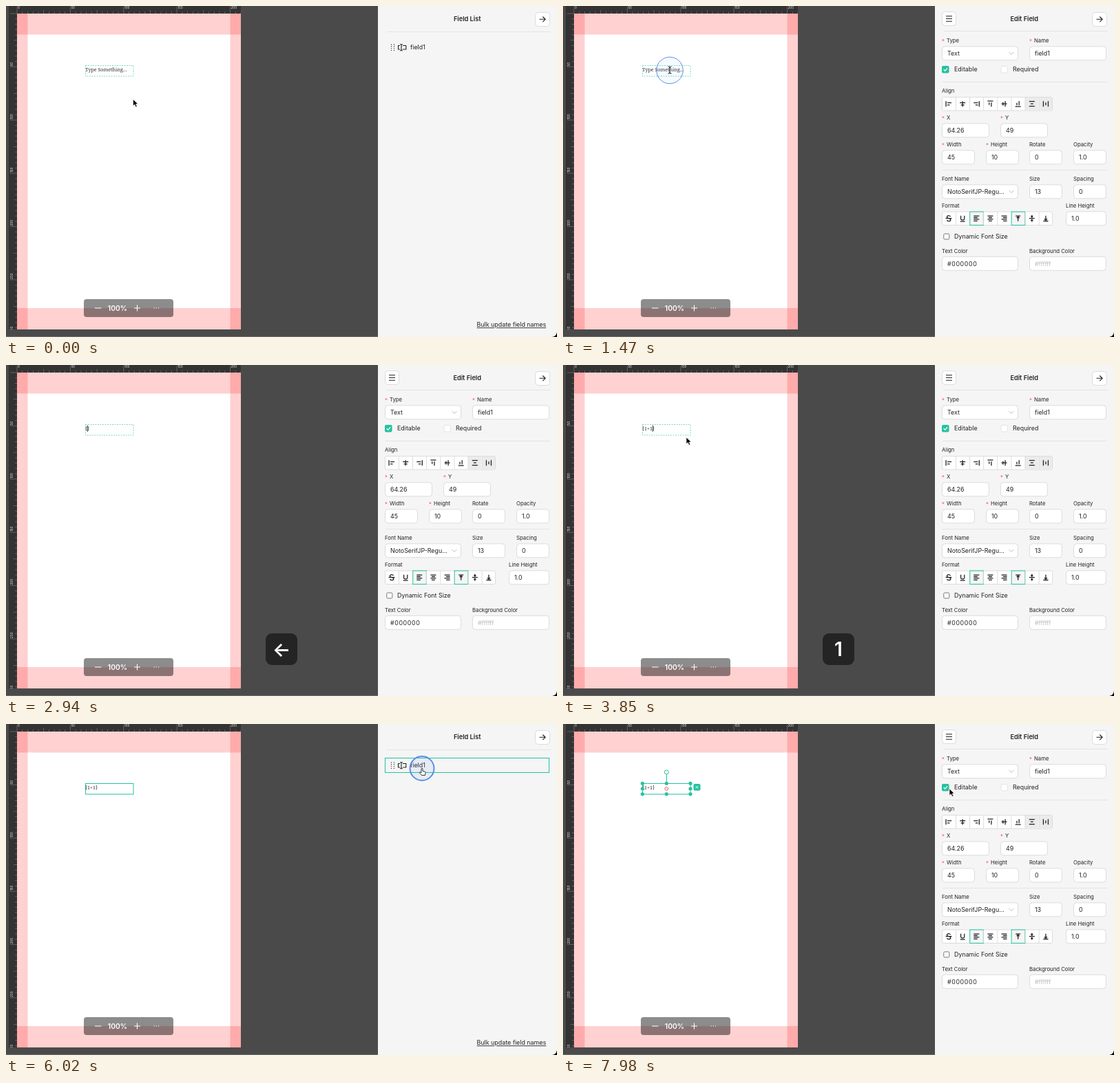
These frames come from a looping animation (800 px wide and 481 px high, 8 s). An HTML page:

```html
<!DOCTYPE html>
<html lang="en">
<head>
<meta charset="utf-8">
<title>Field editor</title>
<style>
html, body { margin: 0; width: 100%; height: 100%; overflow: hidden; background: #4a4a4a; }
svg { display: block; width: 100%; height: 100%; }
text { font-family: Inter, sans-serif; font-size: 8.9px; fill: #222; white-space: pre; }
.label { font-size: 7.75px; }
.title { font-size: 9.2px; font-weight: 600; text-anchor: middle; }
.serif { font-family: "Noto Serif", serif; font-size: 7.15px; fill: #333; }
.tick { font-size: 4.6px; fill: #eee; }
.key { font-size: 28px; font-weight: 600; fill: #fff; text-anchor: middle; }
.line { fill: none; stroke: #222; }
</style>
</head>
<body>
<svg id="stage" viewBox="0 0 800 481" preserveAspectRatio="none"></svg>
<script>
const LOOP = 8000, STEP = 70, TEAL = '#25c2a0', MM = 325 / 210;

const rect = (x, y, w, h, fill, more = '') =>
  `<rect x="${x}" y="${y}" width="${w}" height="${h}" fill="${fill}" ${more}/>`;
const text = (x, y, s, cls = '', more = '') => `<text x="${x}" y="${y}" class="${cls}" ${more}>${s}</text>`;
const line = (d, color = '#222', w = 1, more = '') =>
  `<path d="${d}" fill="none" stroke="${color}" stroke-width="${w}" ${more}/>`;
const dot = (x, y, r, fill, more = '') => `<circle cx="${x}" cy="${y}" r="${r}" fill="${fill}" ${more}/>`;
const at = (x, y, body, more = '') => `<g transform="translate(${x} ${y}) ${more}">${body}</g>`;
const group = (id, body) => `<g id="${id}">${body}</g>`;
const box = (x, y, w, h, r = 3) => rect(x + .5, y + .5, w - 1, h - 1, '#fff', `rx="${r}" stroke="#dcdcdc"`);

function ruler() {
  let ticks = '', labels = '';
  for (let mm = 0; mm <= 300; mm += 5) {
    const len = mm % 50 ? (mm % 25 ? 3 : 5) : 10;
    const x = (16 + mm * MM).toFixed(1), y = (11 + mm * MM).toFixed(1);
    if (mm <= 210) ticks += `M${x} 11v-${len}`;
    if (mm <= 296) ticks += `M16 ${y}h-${len}`;
    if (mm % 50) continue;
    if (mm <= 200) labels += text(+x + 1, 4, mm, 'tick');
    if (mm) labels += text(0, 0, mm, 'tick', `transform="translate(9.5 ${y - 1}) rotate(-90)"`);
  }
  return `<clipPath id="edge"><rect x="4" width="337" height="470"/></clipPath><g clip-path="url(#edge)">` +
    rect(4, 0, 337, 11, '#333') + rect(4, 0, 12, 470, '#333') + line(ticks, '#777', .7) + labels + '</g>';
}

function page() {
  const pink = 'rgba(255,0,0,.18)';
  return rect(16, 11, 325, 459, '#fff') +
    rect(16, 11, 325, 30.5, pink) + rect(16, 439, 325, 31, pink) +
    rect(16, 11, 15.5, 459, pink) + rect(325.5, 11, 15.5, 459, pink);
}

function zoomBar() {
  return rect(113, 426, 130, 26, 'rgba(0,0,0,.45)', 'rx="4"') +
    line('M129 439h9.5M186 439h9M190.5 434.5v9', '#fff', 1.1) +
    text(162, 442.7, '100%', '', 'style="font-size:10.3px;font-weight:600;fill:#fff;text-anchor:middle"') +
    [215, 218.3, 221.6].map(x => dot(x, 439, .8, '#ddd')).join('');
}

function header(title, lineY) {
  return text(669.7, 22, title, 'title') + box(768, 9, 22, 21, 4) +
    line('M774.5 19.3h8.5M779.3 15.5l3.8 3.8-3.8 3.8', '#222', 1.1) +
    line(`M553 ${lineY}H791`, '#e3e3e3');
}

function listPanel() {
  let dots = '';
  for (let i = 0; i < 8; i++) dots += dot(559.5 + i % 2 * 4, 56 + (i >> 1) * 2.8, .7, '#333');
  return header('Field List', 37.5) +
    group('row', rect(550.5, 49.5, 238, 21, 'none', `stroke="${TEAL}"`)) + dots +
    line('M572 55.5q2 0 2 1.5v6.5q0 1.5-2 1.5M576 55.5q-2 0-2 1.5M574 63.500q0 1.500 2 1.500M572 57.500h-2.500v5.500h2.500M576 57.500h4.800v5.500h-4.800', '#222', 1.1) +
    text(587, 63.3, 'field1') +
    text(683.5, 466.3, 'Bulk update field names', '', 'text-decoration="underline"');
}

function buttons(y, icons) {
  const w = 161 / 8;
  return box(550, y, 161, 20.5, 2) + icons.map(([d, turn, state], i) => {
    const x = 550 + i * w;
    const back = state === 'off' ? rect(x, y + 1, w - 1, 18.5, '#ebebeb') : '';
    const frame = state === 'on'
      ? rect(x + .5, y + .5, w - .5, 19.5, '#f5f5f5', `stroke="${TEAL}"`)
      : i ? line(`M${x + .3} ${y + 1}v18.500`, '#dcdcdc') : '';
    return back + frame + at(x + w / 2, y + 10.2, line(d, '#222', 1.3), `rotate(${turn})`);
  }).join('');
}

function editPanel() {
  const left = 'M-4-4V4M-2-1.500H4M-2 1.700H1.500', mid = 'M0-4V4M-4-1.500H4M-2.500 1.700H2.500',
    right = 'M4-4V4M2-1.500H-4M2 1.700H-1.500', spread = 'M-4-3.500H4M-2 0H2M-4 3.500H4';
  const rows = (a, b) => `M-4-3.600H4M${a}-1.200H${b}M-4 1.200H4M${a} 3.600H${b}`;
  const ess = 'M2.500-2.600Q1.500-4 0-4Q-2.600-4-2.600-2Q-2.600-.500 0 0Q2.700.500 2.700 2Q2.700 4 0 4Q-2 4-2.700 2.500M-4.500 0H4.500';
  // label, x, label y, value, width, required
  const fields = [
    ['Type', 550, 53, 'Text', 111, 1], ['Name', 677, 53, 'field1', 112, 1],
    ['X', 550, 165, '64.26', 69, 1], ['Y', 635, 165, '49', 69, 1],
    ['Width', 550, 204, '45', 48, 1], ['Height', 614, 204, '10', 48, 1],
    ['Rotate', 677, 204, '0', 48], ['Opacity', 741, 204, '1.0', 48],
    ['Font Name', 550, 254, 'NotoSerifJP-Regu...', 111], ['Size', 677, 254, '13', 48],
    ['Spacing', 741, 254, '0', 48], ['Line Height', 730, 293, '1.0', 59],
    ['Text Color', 550, 358.5, '#000000', 111], ['Background Color', 677, 358.5, '#ffffff', 112]
  ];
  const form = fields.map(([name, x, y, value, w, must]) =>
    (must ? text(x, y + 1, '*', 'label', 'style="fill:#ff4d4f"') : '') +
    text(x + (must ? 7 : 0), y, name, 'label') + box(x, y + 5.3, w, 21, 4) +
    text(x + 8, y + 19, value, '',
      value === '#ffffff' ? 'style="fill:#bbb"' : value === '#000000' ? 'letter-spacing=".6"' : '')).join('');
  const arrows = [68.5, 269.5].map(y => line(`M647.500 ${y - 1.500}l3.500 3.500 3.500-3.500`, '#bbb')).join('');
  return header('Edit Field', 36.5) + box(550, 8, 21, 21, 4) +
    line('M556 14.800h9M556 18.500h9M556 22.200h9', '#222', 1.1) + form + arrows +
    line('M551 110.500H790M551 238.500H790', '#e3e3e3') +
    rect(550.5, 87.5, 9.500, 9.500, '#fff', 'rx="2" stroke="#ddd"') +
    group('check', rect(550, 87, 10.5, 10.5, TEAL, 'rx="2"') + line('M552.700 92.200l2 2.100 3.400-4', '#fff', 1.3)) +
    text(568, 95.3, 'Editable') +
    rect(636, 87.5, 9.5, 9.5, '#fff', 'rx="2" stroke="#e4e4e4"') + text(653, 95.3, 'Required') +
    text(550, 126.3, 'Align', 'label') +
    buttons(132, [[left, 0], [mid, 0], [right, 0], [left, 90], [mid, 90], [right, 90],
      [spread, 0, 'off'], [spread, 90, 'off']]) +
    text(550, 293, 'Format', 'label') +
    buttons(298.5, [[ess, 0], ['M-2.600-4V0Q-2.600 2.400 0 2.400Q2.600 2.400 2.600 0V-4M-3.500 4.500H3.500', 0],
      [rows(-4, 1.5), 0, 'on'], [rows(-2.5, 2.5), 0], [rows(-1.5, 4), 0],
      ['M-3.500-3.600H3.500M0-2.500V4M-2-.500L0-2.500L2-.500', 0, 'on'],
      ['M-4 0H4M0-5V-2M-1.500-3.200L0-1.700L1.500-3.200M0 5V2M-1.500 3.200L0 1.700L1.500 3.200', 0],
      ['M-3.500 3.800H3.500M0-4V2.500M-2 .500L0 2.500L2 .500', 0]]) +
    rect(552.8, 331, 8, 8, '#fff', 'rx="1.5" stroke="#767676"') + text(568, 338.3, 'Dynamic Font Size');
}

function handles() {
  let s = line('M150.500 86.500V73', TEAL) + rect(115.5, 86.5, 69.5, 15.5, 'none', `stroke="${TEAL}"`);
  for (const x of [115.3, 150.3, 185])
    for (const y of [86.3, 94, 101.8])
      s += x === 150.3 && y === 94 ? dot(x, y, 2.4, '#fff', 'stroke="#f55"') : dot(x, y, 2.6, TEAL);
  return s + dot(150.3, 70, 3, '#fff', `stroke="${TEAL}"`) +
    rect(189.5, 87, 10, 9.8, TEAL, 'rx="2"') + line('M192.600 90l3.800 3.800M196.400 90l-3.800 3.800', '#fff', .9);
}

function pointers() {
  const arrow = '<path d="M0 0V9.800L2.300 7.700L4 11.400L5.800 10.600L4.100 7H7.200Z" fill="#000" stroke="#fff" stroke-width=".7"/>';
  const beam = line('M-2.500-5Q0-5 0-3.500V3.500Q0 5-2.500 5M2.500-5Q0-5 0-3.500M0 3.500Q0 5 2.500 5', '#222', 1.1);
  const hand = '<path d="M-1 1Q0-.500 1 1V4.500L4.300 5.200Q5.300 5.600 5.100 6.800L4.400 10.500H-.500L-3.500 6.800Q-3.800 5.600-2.600 5.700L-1 6.800Z" fill="#fff" stroke="#222" stroke-width=".9"/>';
  return group('arrow', arrow) + group('beam', beam) + group('hand', hand);
}

const keycap = x => rect(x, 390, 800 - 2 * x, 46, '#242424', 'rx="9"');
const command = line('M18 3a3 3 0 0 0-3 3v12a3 3 0 1 0 3-3H6a3 3 0 1 0 3 3V6a3 3 0 1 0-3 3h12a3 3 0 1 0 0-6z', '#fff', 2.1);

const stage = document.getElementById('stage');
stage.innerHTML = rect(0, 0, 800, 481, '#4a4a4a') + ruler() + page() +
  group('mark', rect(115, 87, 63, 10.5, '#b3d7ff')) + text(115, 94.6, '', 'serif', 'id="words"') +
  group('caret', line('M0 87.500V97', '#222', .8)) +
  rect(115.5, 86.5, 69.5, 15.5, 'none', `id="frame" stroke="${TEAL}"`) + group('handles', handles()) + zoomBar() +
  group('combo', keycap(360.5) + at(376.7, 399.2, command, 'scale(1.15)') + text(413.5, 423, 'A', 'key', 'style="font-weight:500"')) +
  group('single', keycap(377) + text(400, 423, '', 'key', 'id="cap"')) +
  rect(0, 480, 540, 1, '#6a6a6a') + rect(540, 0, 260, 481, '#f5f5f5') +
  group('list', listPanel()) + group('edit', editPanel()) +
  '<path d="M800 474Q799 480 793 481H800Z" fill="#000"/>' +
  '<circle id="ring" stroke="#5b8fe8"/>' + group('pointer', pointers());

const el = {};
stage.querySelectorAll('[id]').forEach(n => el[n.id] = n);
const show = (id, on) => el[id].setAttribute('visibility', on ? 'inherit' : 'hidden');

// time, x, y of the pointer
const path = [[0, 184.5, 135.5], [560, 155, 93], [3640, 155, 93], [3850, 179, 105], [4200, 205, 140], [4480, 205, 140],
  [5110, 134, 81], [5320, 134, 81], [5880, 604, 64], [6160, 604, 64], [7000, 664, 305], [7770, 664, 305], [7980, 561, 94]];
const clicks = [560, 1260, 4200, 5950];
// time, pressed key, text, caret index
const typing = [[2450, '{', '{', 1], [2800, '}', '{}', 2], [2940, '←', '{}', 1],
  [3010, '1', '{1}', 2], [3220, '+', '{1+}', 3], [3360, '1', '{1+1}', 4]];
const clamp = v => Math.max(0, Math.min(1, v));

function pointerAt(t) {
  const i = path.findIndex(p => p[0] > t);
  if (i < 0) return path[path.length - 1].slice(1);
  const [t0, x0, y0] = path[i - 1], [t1, x1, y1] = path[i];
  const k = (t - t0) / (t1 - t0), e = k * k * (3 - 2 * k);
  return [x0 + (x1 - x0) * e, y0 + (y1 - y0) * e];
}

function draw(time) {
  const t = Math.floor(time / STEP) * STEP;
  const within = (a, b) => t >= a && t < b;
  const listed = t < 700 || within(4270, 6090);
  const editing = within(1330, 4270);
  const picked = within(700, 1330) || t >= 6090;
  const [x, y] = pointerAt(t);
  const onRow = listed && x > 550 && y > 49 && y < 71;

  show('list', listed);
  show('edit', !listed);
  show('row', onRow);
  el.check.setAttribute('opacity', clamp((t - (t < 4270 ? 700 : 6090)) / 200));
  show('handles', picked);
  show('frame', !picked);
  el.frame.setAttribute('stroke-dasharray', onRow ? 'none' : '2 1.5');
  el.frame.setAttribute('stroke-opacity', onRow ? 1 : .6);

  const typed = typing.filter(k => k[0] <= t).pop();
  el.words.textContent = typed ? typed[2] : 'Type Something...';
  show('mark', within(1820, 2450));
  show('caret', editing && typed);
  if (typed) {
    el.caret.setAttribute('transform', `translate(${118.4 + (typed[3] - 1) * 3.95} 0)`);
    el.cap.textContent = typed[1];
  }
  show('combo', within(1750, 2450));
  show('single', within(2450, 4340));
  el.single.setAttribute('opacity', 1 - clamp((t - 4060) / 280));

  const click = clicks.find(c => within(c, c + 350));
  show('ring', click !== undefined);
  if (click !== undefined) {
    const k = (t - click) / 350;
    const look = { cx: x, cy: y + .5, r: 16.6 + 4.5 * k, 'stroke-width': 2.5 - 2.5 * k,
      fill: `rgba(91,143,232,${.12 * (1 - k)})` };
    for (const a in look) el.ring.setAttribute(a, look[a]);
  }

  const onText = within(1330, 2450);
  show('pointer', !within(2450, 3850));
  show('beam', onText);
  show('hand', onRow);
  show('arrow', !onText && !onRow);
  el.pointer.setAttribute('transform', `translate(${x} ${y})`);
}

function tick() {
  draw(performance.now() % LOOP);
  requestAnimationFrame(tick);
}
tick();
</script>
</body>
</html>
```
